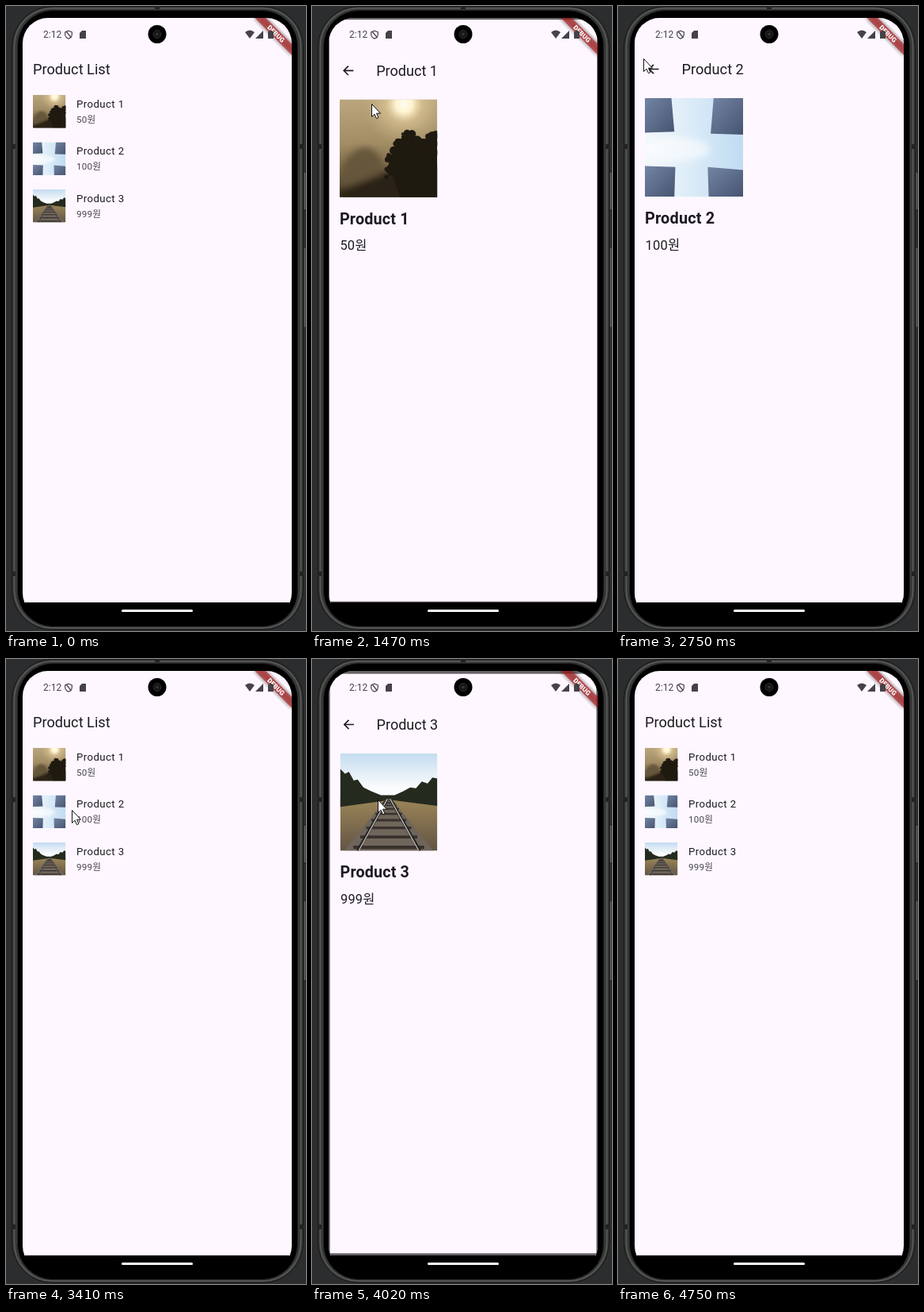
An HTML page that plays this animation: 379 px wide and 787 px high, repeating every 4950 ms.

```html
<!DOCTYPE html>
<html lang="ko">
<head>
<meta charset="utf-8">
<title>Product list</title>
<style>
  html, body { margin: 0; width: 100%; height: 100%; overflow: hidden; background: #2c2d2f; }
  svg { display: block; width: 379px; height: 787px; }
  text { font-family: Roboto, "Noto Sans CJK KR", "Noto Sans CJK", sans-serif; fill: #1d1b20; white-space: pre; }
  .bar { font-size: 18.2px; }
  .name { font-size: 13.2px; letter-spacing: .41px; }
  .price { font-size: 11.6px; letter-spacing: .2px; fill: #49454f; }
  .head { font-size: 19.85px; font-weight: 700; letter-spacing: .2px; }
  .cost { font-size: 16.5px; letter-spacing: .2px; }
  .clock { font-size: 12px; fill: #454348; }
  .debug { font-size: 8.4px; font-weight: 900; fill: #fff; text-anchor: middle; }
</style>
</head>
<body>
<svg id="stage" viewBox="0 0 379 787">
  <defs>
    <clipPath id="screen"><rect x="21" y="15" width="340" height="756" rx="32"/></clipPath>
    <clipPath id="square"><rect width="100" height="100"/></clipPath>
    <filter id="soft" x="-30%" y="-30%" width="160%" height="160%"><feGaussianBlur stdDeviation="3.3"/></filter>
    <linearGradient id="mist" x2="0" y2="1">
      <stop stop-color="#baa67e"/><stop offset=".45" stop-color="#a28d65"/>
      <stop offset=".72" stop-color="#776646"/><stop offset="1" stop-color="#3a301f"/>
    </linearGradient>
    <radialGradient id="sun" cx="66" cy="5" r="42" gradientUnits="userSpaceOnUse">
      <stop stop-color="#fffdf0"/><stop offset=".2" stop-color="#fff3cf"/>
      <stop offset=".45" stop-color="#dcc594" stop-opacity=".7"/><stop offset="1" stop-color="#c9b184" stop-opacity="0"/>
    </radialGradient>
    <linearGradient id="air" x2="1" y2="0">
      <stop stop-color="#f4f8fb"/><stop offset=".45" stop-color="#dcecf8"/><stop offset="1" stop-color="#c0dbf2"/>
    </linearGradient>
    <linearGradient id="tower" x2="1" y2="1">
      <stop stop-color="#7385a5"/><stop offset="1" stop-color="#46546f"/>
    </linearGradient>
    <linearGradient id="day" x2="0" y2="1">
      <stop stop-color="#c4dcf0"/><stop offset=".35" stop-color="#fafbfc"/>
    </linearGradient>
    <linearGradient id="field" x2="0" y2="1">
      <stop stop-color="#9c8658"/><stop offset="1" stop-color="#625443"/>
    </linearGradient>

    <g id="photo1" clip-path="url(#square)">
      <rect width="100" height="100" fill="url(#mist)"/>
      <rect width="100" height="100" fill="url(#sun)"/>
      <g filter="url(#soft)">
        <path d="M2 100V72Q10 50 27 49Q43 52 47 76V100Z" fill="#66563b"/>
        <path d="M0 92Q30 82 52 72L110 66V110H0Z" fill="#2b2317"/>
      </g>
      <path d="M50 66L60 40H100V100H62Z" fill="#1f1a10"/>
      <g id="leaves" fill="#1f1a10"></g>
    </g>
    <g id="photo2" clip-path="url(#square)">
      <rect width="100" height="100" fill="url(#air)"/>
      <ellipse cx="32" cy="52" rx="34" ry="12" fill="#fff" opacity=".6" filter="url(#soft)"/>
      <g fill="url(#tower)">
        <path d="M0 0H27L30 34L0 35Z"/><path d="M70 0H100V37L67 36Z"/>
        <path d="M0 69L31 70L30 100H0Z"/><path d="M64 70L100 73V100H65Z"/>
      </g>
    </g>
    <g id="photo3" clip-path="url(#square)">
      <rect width="100" height="100" fill="url(#day)"/>
      <rect y="46" width="100" height="54" fill="url(#field)"/>
      <path d="M0 16L5 21L9 19L14 28L18 27L24 35L32 39L42 43H56L65 39L72 35L78 36L84 29L90 31L95 25L100 26V54L52 48L0 55Z" fill="#252a1e"/>
      <path d="M47 47H53L96 100H4Z" fill="#6f655b"/>
      <path id="ties" fill="#38312c"/>
      <path d="M48.5 47L18 100M51.5 47L82 100" stroke="#232325" stroke-width="3"/>
      <path d="M48.500 47L19 100M51.500 47L81 100" stroke="#c9c3bb" stroke-width="1"/>
    </g>
  </defs>

  <rect width="379" height="787" fill="#2c2d2f"/>
  <path d="M376 209h3v48h-3zM376 304h3v101h-3z" fill="#606162" stroke="#1b1b1b"/>
  <rect x="7.5" y=".5" width="368" height="785" rx="51" fill="#363737" stroke="#171717"/>
  <rect x="10.5" y="3" width="362" height="780" rx="48" fill="none" stroke="#5a5b5b" stroke-width="1.500"/>
  <rect x="14.5" y="5.5" width="354" height="776" rx="45" fill="#000" stroke="#242424"/>
  <path d="M7 174h5v6h-5zM7 712h5v6h-5zM371 174h5v6h-5zM371 712h5v6h-5zM188 0h6v4h-6z" fill="#222"/>

  <g clip-path="url(#screen)">
    <g id="list"></g>
    <rect id="scrim" x="21" y="15" width="340" height="736" opacity=".6"/>
    <g id="detail"></g>
    <g transform="translate(361 15) rotate(45)">
      <rect x="-33" y="23.200" width="66" height="9.900" opacity=".5" filter="url(#soft)"/>
      <rect x="-33" y="23.200" width="66" height="9.900" fill="#b71c1c" opacity=".63"/>
      <text class="debug" y="31.200">DEBUG</text>
    </g>
    <g fill="#454348">
      <text class="clock" x="47" y="40">2:12</text>
      <path d="M79 31.2L83.3 33V36Q83 39.5 79 41.2Q75 39.5 74.7 36V33ZM76 32L82.5 40" fill="none" stroke="#454348" stroke-width="1.2"/>
      <path d="M96 31H101V41H93V34Z"/>
      <path d="M302 33Q308 28 314 33L308 41Z"/>
      <path d="M315 41L325 31V41Z"/>
      <path d="M331 32h2v-1h3v1h2v9h-7z"/>
    </g>
    <rect x="21" y="751" width="340" height="24"/>
  </g>
  <circle cx="191" cy="35.5" r="11.5"/>
  <circle cx="191" cy="35.5" r="5" fill="#161616" stroke="#2d2d2d"/>
  <circle cx="191" cy="35.5" r="1.8" fill="#353535"/>
  <rect x="146" y="760" width="90" height="3" rx="1.5" fill="#fff"/>

  <circle id="touch" r="12" fill="#777" opacity=".4"/>
  <path id="cursor" d="M.5 .5V16.5L4 13.2L6.5 18.7L8.9 17.6L6.5 12.2H11.5Z" fill="#fff" stroke="#111"/>
</svg>
<script>
const $ = id => document.getElementById(id);
const LOOP = 4950, TICK = 66.9;
const prices = ["50원", "100원", "999원"];

// Ticks at which each product page opens and closes, with the scales it settles through.
const visits = [
  { id: 1, open: 22, grow: [.994], close: 31, settle: [1.074, 1.025, 1.006] },
  { id: 2, open: 38, grow: [.93, .985], close: 46, settle: [1.1, 1.06, 1.02, 1.006] },
  { id: 3, open: 59, grow: [.95, .99], close: 66, settle: [1.045, 1.015, 1.004] }
];
const taps = [18, 30, 45, 63];

// Pointer path: tick, x, y
const path = [
  [2, 329, 743], [3, 300, 650], [5, 215, 400], [7, 135, 225], [9, 98, 154], [11, 79, 131],
  [19, 79, 131], [22, 75, 123], [25, 50, 92], [28, 40, 76], [30, 40, 76], [31, 48, 92],
  [34, 97, 189], [37, 100, 187], [38, 96, 180], [41, 32, 66], [44, 26, 72], [46, 26, 72],
  [50, 70, 165], [53, 110, 240], [57, 127, 275], [58, 127, 275], [62, 38, 78], [63, 38, 78],
  [66, 201, 360], [70, 349, 760]
];

const page = '<rect x="21" y="15" width="340" height="737" fill="#fef7ff"/>';
const text = (cls, x, y, s) => `<text class="${cls}" x="${x}" y="${y}">${s}</text>`;
const photo = (id, x, y, size) =>
  `<use href="#photo${id}" transform="translate(${x} ${y}) scale(${size / 100})"/>`;

function listRow(price, i) {
  const y = 103 + i * 59.5, base = Math.floor(y);
  return `<rect id="row${i + 1}" x="21" y="${y}" width="340" height="59.5" fill="#ece7ec"/>`
    + photo(i + 1, 34, y + 9, 41.4)
    + text("name", 89, base + 25, "Product " + (i + 1))
    + text("price", 89, base + 44, price);
}

function detailPage(price, i) {
  const name = "Product " + (i + 1);
  return `<g id="page${i + 1}">` + page
    + '<path d="M51.5 79.5H39.5M45 73.8L39.3 79.5L45 85.2" fill="none" stroke="#1d1b20" stroke-width="1.65"/>'
    + text("bar", 80.5, 86, name) + photo(i + 1, 34, 116, 124)
    + text("head", 34, 274, name) + text("cost", 34.5, 307, price) + "</g>";
}

$("list").innerHTML = page + text("bar", 34, 86, "Product List") + prices.map(listRow).join("");
$("detail").innerHTML = prices.map(detailPage).join("");

let seed = 7;
const random = () => (seed = seed * 16807 % 2147483647) / 2147483647;

let leaves = "";
for (let i = 0; i < 110; i++) {
  const x = 48 + random() * 53;
  const top = 36 + Math.max(0, 60 - x) * 1.7 + 2 * Math.sin(x / 4);
  leaves += `<circle cx="${x}" cy="${top + random() * 26}" r="${1.5 + random() * 3}"/>`;
}
$("leaves").innerHTML = leaves;

let ties = "";
for (let i = 0; i < 9; i++) {
  const y = 50 + i * i * .7, half = 4 + (y - 47) * .68;
  ties += `M${50 - half} ${y}H${50 + half}v${.6 + i * .35}H${50 - half}Z`;
}
$("ties").setAttribute("d", ties);

const show = (el, on) => { el.style.display = on ? "" : "none"; };
const zoom = (el, s) =>
  el.setAttribute("transform", `translate(191 383) scale(${s}) translate(-191 -383)`);

function pointerAt(k) {
  const i = Math.max(1, path.findIndex(p => p[0] >= k));
  const [t0, x0, y0] = path[i - 1], [t1, x1, y1] = path[i];
  const f = (k - t0) / (t1 - t0);
  return [x0 + (x1 - x0) * f, y0 + (y1 - y0) * f];
}

function draw(k) {
  const last = visits.filter(v => k >= v.open).pop();
  const inside = last && k < last.close;
  const scale = !last ? 1 : inside ? last.grow[k - last.open] || 1 : last.settle[k - last.close] || 1;

  show($("scrim"), inside);
  show($("detail"), inside);
  zoom($("detail"), inside ? scale : 1);
  zoom($("list"), inside ? 1 : scale);
  for (const { id } of visits) {
    const current = last && last.id === id;
    const since = current && !inside ? k - last.close : 9;
    show($("page" + id), current && inside);
    $("row" + id).setAttribute("opacity", since < 4 ? 1 : since === 4 ? .5 : 0);
  }

  const visible = k >= 2 && k <= 70;
  show($("cursor"), visible);
  show($("touch"), taps.includes(k));
  if (visible) {
    const place = `translate(${pointerAt(k).map(Math.round).join(" ")})`;
    $("cursor").setAttribute("transform", place);
    $("touch").setAttribute("transform", place);
  }
}

const start = performance.now();
function frame() {
  const t = (performance.now() - start) % LOOP;
  draw(Math.floor((t + 9) / TICK));
  requestAnimationFrame(frame);
}
frame();
</script>
</body>
</html>
```
